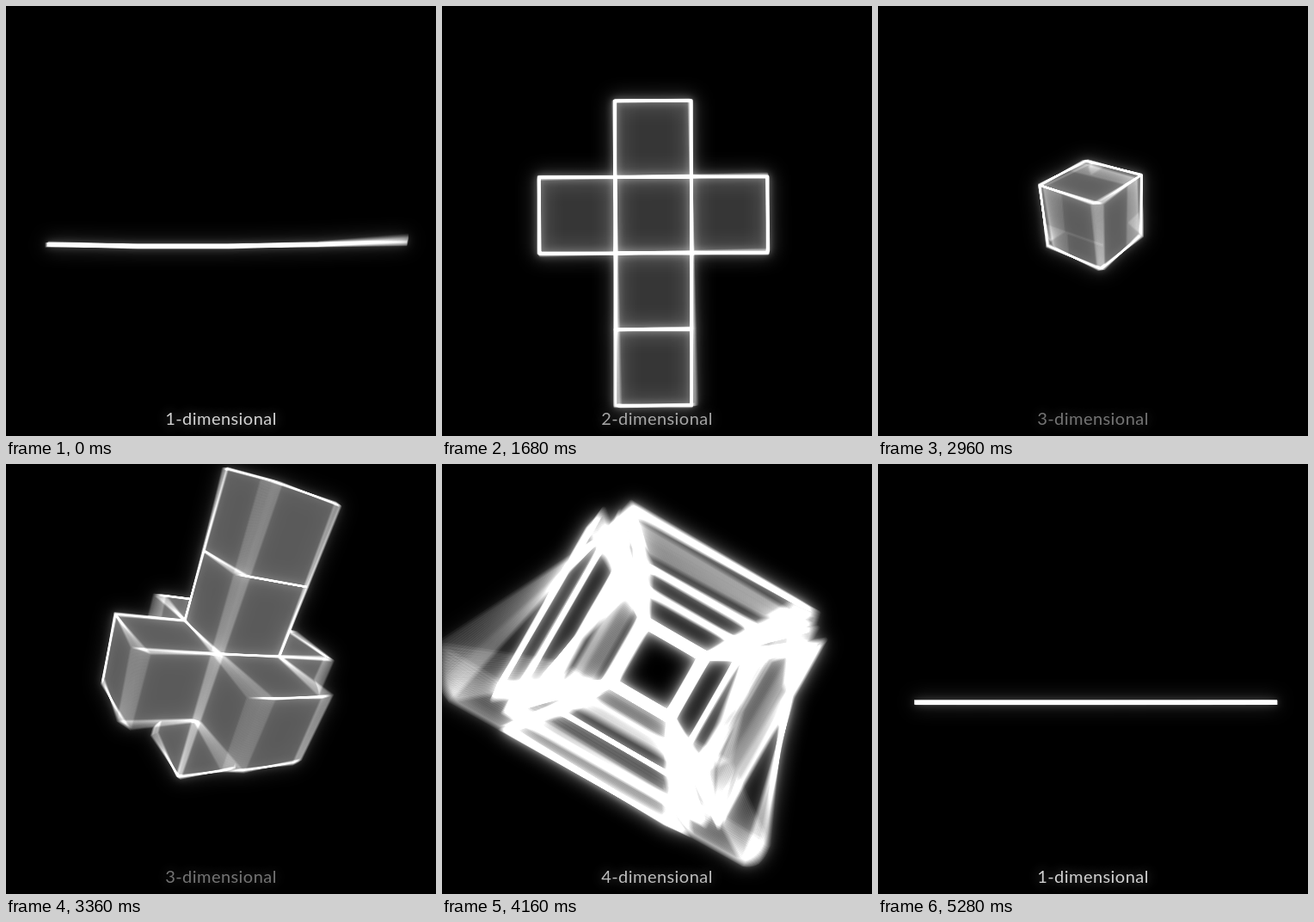
An HTML page with a canvas for the animation above (5360 ms loop, 500 by 500 pixels).

```html
<!DOCTYPE html>
<html lang="en">
<head>
<meta charset="utf-8">
<title>Dimensions</title>
<style>
  html, body { margin: 0; width: 100%; height: 100%; overflow: hidden; background: #000; }
  #stage { position: relative; width: 500px; height: 500px; overflow: hidden; }
  canvas { display: block; }
  #label {
    position: absolute; left: 0; top: 467px; width: 500px; margin: 0;
    font: 400 20px/24px Lato, sans-serif; letter-spacing: .45px; text-align: center;
    color: #fff; text-shadow: 0 0 14px rgba(255, 255, 255, .5);
  }
</style>
</head>
<body>
<div id="stage"><canvas id="view" width="500" height="500"></canvas><p id="label"></p></div>
<script>
const SIZE = 500, LOOP = 5360, STEP = 80, SHUTTER = 64, SAMPLES = 26;
const FOCAL = 460, GAIN = 1.15, LEAN = .5;
const view = document.getElementById('view').getContext('2d');
const label = document.getElementById('label');
const layer = () => Object.assign(document.createElement('canvas'), { width: SIZE, height: SIZE }).getContext('2d');
const scene = layer(), blurred = layer();

const clamp = v => Math.min(1, Math.max(0, v));
const mix = (a, b, k) => a + (b - a) * k;
const span = (t, from, to) => clamp((t - from) / (to - from));
const ease = (k, power = 2) => k < .5 ? Math.pow(2 * k, power) / 2 : 1 - Math.pow(2 - 2 * k, power) / 2;
const rad = deg => deg * Math.PI / 180;
const dot = (a, b) => a.reduce((sum, v, i) => sum + v * b[i], 0);
const unit = a => { const n = Math.hypot(...a); return a.map(v => v / n); };
const cross = (a, b) => [a[1] * b[2] - a[2] * b[1], a[2] * b[0] - a[0] * b[2], a[0] * b[1] - a[1] * b[0]];

// Heading of the leaning axis and turn about it, in degrees.
const POSES = [
  { at: 1680, heading: -200, turn: 0 },
  { at: 2320, heading: -163, turn: 16 },
  { at: 3360, heading: -55, turn: 217 },
  { at: 4160, heading: 0, turn: 360 },
  { at: 4720, heading: 45, turn: 400 },
  { at: 5040, heading: 70, turn: 423 }
];

function poseAt(t) {
  const i = Math.max(1, POSES.findIndex((pose, n) => t < pose.at || n === POSES.length - 1));
  const a = POSES[i - 1], b = POSES[i], k = span(t, a.at, b.at);
  return { heading: rad(mix(a.heading, b.heading, k)), turn: rad(mix(a.turn, b.turn, k)) };
}

// How opaque the faces are; the outlines are thin while they are solid.
const solidity = t => span(t, 1040, 2240) * (1 - span(t, 3440, 4000));

// Two cells in a row hinged to the edge of the central one: [distance, lift].
function hinge(r, angle) {
  const first = Math.min(r, 1), second = Math.max(r - 1, 0);
  return [.5 + first * Math.cos(angle) + second * Math.cos(2 * angle),
          first * Math.sin(angle) + second * Math.sin(2 * angle)];
}

// Corners of every cell in the net of a cube (dim 2) or a tesseract (dim 3).
function netCells(dim, angle) {
  const cells = [null];
  for (let axis = 0; axis < dim; axis++)
    for (const sign of [-1, 1]) cells.push({ axis, sign, start: 0 });
  cells.push({ axis: 1, sign: dim === 2 ? -1 : 1, start: 1 });

  const perspective = .65 * Math.pow(clamp(angle / rad(90)), 1.4);
  return cells.map(cell => Array.from({ length: 1 << dim }, (_, bits) => {
    const p = [0, 0, 0];
    let lift = 0;
    for (let i = 0; i < dim; i++) p[i] = (bits >> i & 1) - .5;
    if (cell) {
      const [distance, height] = hinge(cell.start + p[cell.axis] + .5, angle);
      p[cell.axis] = cell.sign * distance;
      lift = height;
    }
    if (dim === 2) return [p[0], p[1], .5 - lift];
    return p.map(v => v / (1 - perspective * lift));
  }));
}

// Corner indices of the faces of one cell.
function cellFaces(dim) {
  const faces = [];
  for (let axis = dim === 2 ? 2 : 0; axis < 3; axis++)
    for (let side = 0; side < dim - 1; side++) {
      const base = side << axis, b = 1 << (axis + 1) % 3, c = 1 << (axis + 2) % 3;
      faces.push([base, base | b, base | b | c, base | c]);
    }
  return faces;
}

function camera(t) {
  const { heading, turn } = poseAt(t);
  const lean = LEAN * span(t, 1680, 2320);
  const up = unit([lean * Math.cos(heading), -.87, lean * Math.sin(heading)]);
  const towards = [0, 0, -1], k = dot(towards, up);
  const front = unit(towards.map((v, i) => v - k * up[i])), side = cross(up, front);
  const c = Math.cos(turn), s = Math.sin(turn);
  const right = side.map((v, i) => v * c - front[i] * s);
  const near = front.map((v, i) => v * c + side[i] * s);
  const drift = span(t, 1040, 2320), depth = mix(5.05, 5.7, span(t, 1040, 1680));
  const cx = mix(241.5, 250, drift), cy = mix(247, 239, drift);
  return p => {
    const [x, y, z] = [0, 1, 2].map(i => p[0] * right[i] + p[1] * up[i] + p[2] * near[i]);
    const scale = FOCAL / (z + depth);
    return [cx + x * scale, cy + y * scale, z];
  };
}

function trace(points) {
  scene.beginPath();
  points.forEach(p => scene.lineTo(p[0], p[1]));
}

// Four equal pieces curl up into a square.
function drawLine(t) {
  const k = span(t, -80, 640), angle = rad(90 * ease(k, 2.5));
  const side = mix(105.5, 101, k), x = mix(147.5, 191, k), y = mix(277, 297.5, k);
  const dx = side * Math.cos(angle), dy = side * Math.sin(angle);
  const right = [x + side + dx, y - dy];
  trace([[x - dx, y - dy], [x, y], [x + side, y], right,
         [right[0] + side * Math.cos(2 * angle), right[1] - side * Math.sin(2 * angle)]]);
  scene.stroke();
}

// The net opens from 180 degrees to flat, then folds by 90 degrees.
function drawCells(t) {
  const flat = t < 2280, dim = flat ? 2 : 3;
  const opened = flat ? ease(span(t, 1000, 1640)) : ease(span(t, 2800, 3300));
  const folded = flat ? ease(span(t, 1720, 2260)) : ease(span(t, 3560, 4320));
  const angle = rad((flat ? 180 : -180) * (1 - opened) + 90 * folded);
  const project = camera(t), outline = cellFaces(dim);
  const faces = netCells(dim, angle).flatMap(corners => {
    const points = corners.map(project);
    return outline.map(face => face.map(i => points[i]));
  });
  const depth = face => face.reduce((sum, p) => sum + p[2], 0);
  faces.sort((a, b) => depth(b) - depth(a));
  scene.fillStyle = `rgba(42, 42, 42, ${solidity(t)})`;
  for (const face of faces) {
    trace(face);
    scene.closePath();
    scene.fill();
    scene.stroke();
  }
}

function clear(ctx) {
  ctx.globalCompositeOperation = 'source-over';
  ctx.filter = 'none';
  ctx.globalAlpha = 1;
  ctx.fillStyle = '#000';
  ctx.fillRect(0, 0, SIZE, SIZE);
}

function drawMoment(t) {
  clear(scene);
  scene.strokeStyle = '#fff';
  scene.lineJoin = 'round';
  scene.lineWidth = mix(5.3, 2.3, solidity(t));
  if (t < 1000) drawLine(t); else drawCells(t);
}

function addLayer(blur, alpha) {
  view.filter = blur ? `blur(${blur}px)` : 'none';
  view.globalAlpha = clamp(alpha);
  view.drawImage(blurred.canvas, 0, 0);
}

function render(time) {
  const t = time >= LOOP - STEP ? time - LOOP : time;
  const gain = GAIN * (1 - span(t, 4880, 5040));
  const glow = mix(.4, 1, span(t, -80, 640)) * mix(1, .5, solidity(t));

  // Add up several moments inside the shutter for motion blur.
  clear(blurred);
  blurred.globalCompositeOperation = 'lighter';
  blurred.globalAlpha = gain / SAMPLES;
  if (gain > 0) for (let i = 0; i < SAMPLES; i++) {
    drawMoment(Math.max(-STEP, t + ((i + .5) / SAMPLES - .5) * SHUTTER));
    blurred.drawImage(scene.canvas, 0, 0);
  }

  clear(view);
  view.globalCompositeOperation = 'lighter';
  addLayer(0, 1);
  addLayer(4, .6 * glow);
  addLayer(11, .9 * glow);

  const dimension = t < 640 ? 1 : t < 2000 ? 2 : t < 3840 ? 3 : 4;
  label.textContent = dimension + '-dimensional';
  label.style.opacity = .82 - .37 * Math.pow(span(t, 0, 2800), 1.4) + .42 * span(t, 3440, 4480);
}

let shown = -1;
const start = performance.now();
function tick() {
  const frame = Math.floor(((performance.now() - start) % LOOP) / STEP);
  if (frame !== shown) {
    shown = frame;
    render(frame * STEP);
  }
  requestAnimationFrame(tick);
}
tick();
</script>
</body>
</html>
```
